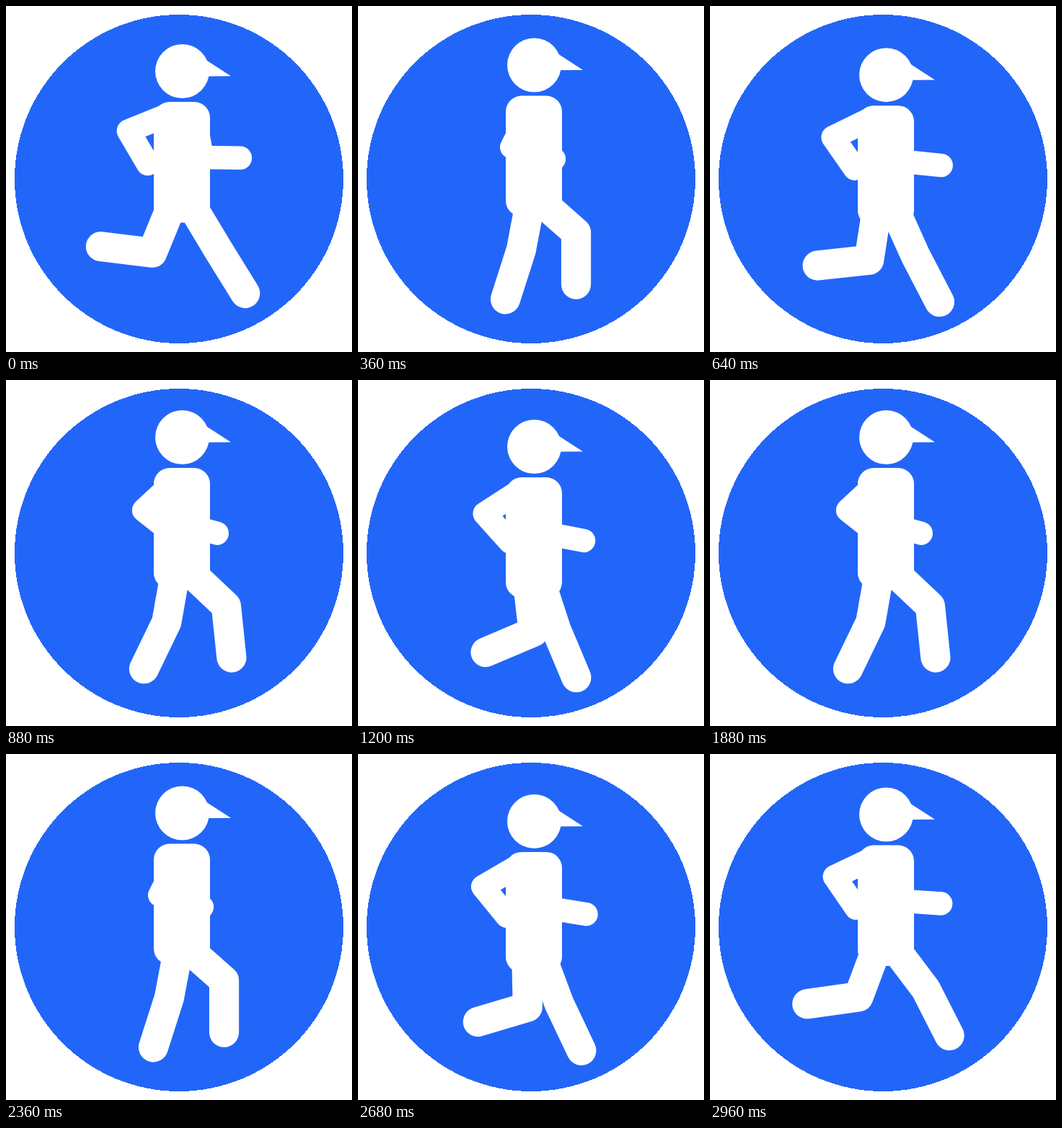
Animation, 480 px wide and 480 px high, one loop 3000 ms. Source, as an HTML page:

```html
<!DOCTYPE html>
<html lang="en">
<head>
<meta charset="utf-8">
<title>Runner</title>
<style>
  html, body { margin: 0; width: 100%; height: 100%; overflow: hidden; background: #fff; }
  svg { display: block; width: 100vw; height: 100vh; }
  .limb { fill: none; stroke: #fff; stroke-linecap: round; stroke-linejoin: round; }
  .arm { stroke-width: 32.5; }
  .leg { stroke-width: 41.2; }
</style>
</head>
<body>
<svg viewBox="0 0 480 480">
  <circle cx="240" cy="240" r="228" fill="#2266f9" shape-rendering="crispEdges"/>
  <polyline class="limb arm"/>
  <polyline class="limb arm"/>
  <polyline class="limb leg"/>
  <polyline class="limb leg"/>
  <g id="body" fill="#fff">
    <circle cx="244.5" cy="37.5" r="37.5"/>
    <path d="M278 22.3L312 44.2L280 44.5Z"/>
    <rect x="205" y="80" width="78" height="167.5" rx="22"/>
  </g>
</svg>
<script>
const STRIDE = 1000, STEP = 40, LOOP = 3000;
const THIGH = 75, SHIN = 72, UPPER = 60, FORE = 53;

// Smooth periodic curve through keyed values.
function track(times, values, period) {
  const n = times.length;
  const at = i => times[(i + n) % n] + Math.floor(i / n) * period;
  const val = i => values[(i + n) % n];
  const slope = i => (val(i + 1) - val(i - 1)) / (at(i + 1) - at(i - 1));
  return t => {
    t = ((t % period) + period) % period;
    let i = n - 1;
    while (times[i] > t) i--;
    const d = at(i + 1) - at(i), u = (t - at(i)) / d, v = 1 - u;
    return val(i) * v * v * (1 + 2 * u) + val(i + 1) * u * u * (3 - 2 * u)
      + d * u * v * (slope(i) * v - slope(i + 1) * u);
  };
}

const half = [0, 60, 130, 200, 280, 360, 380, 460];
const full = half.concat(half.map(t => t + STRIDE / 2));
const cycle = values => track(full, values, STRIDE);
const swing = values => cycle(values.concat(values.map(v => -v)));

// Angles are degrees from straight down, positive towards the front.
const thigh = cycle([31, 29.5, 25, 18, 4, -10.7, -10, -20.5,
                     -22.3, -23.5, -11, 6.5, 29, 48.6, 46.7, 37]);
const shin = cycle([31.7, 31, 28, 22.8, 3, -17.7, -25.8, -82,
                    -97, -97, -86, -67, -35, 0, 6, 27]);
const upper = cycle([-68, -69, -65, -57, -42, -25, -10, 7,
                     10, 10, 6, 0, -12, -27, -47, -64.5]);
const bend = cycle([98.5, 98.5, 99, 99, 99, 98, 85, 79,
                    79, 79, 79, 79, 85, 98, 98.6, 99]);
const hip = swing([12, 12.5, 11.5, 8.5, 3, -3, -7.5, -11]);
const shoulder = swing([-18, -19, -19, -17.5, -8, 3, 8.5, 16.5]);
const bob = track([0, 60, 130, 200, 280, 320, 360, 380, 405, 430, 460],
                  [53, 58, 58.5, 55, 53.5, 48.8, 44.5, 42, 40.4, 41.8, 46.5], STRIDE / 2);

const body = document.getElementById("body");
const arms = document.querySelectorAll(".arm");
const legs = document.querySelectorAll(".leg");

function reach([x, y], length, angle) {
  const a = angle * Math.PI / 180;
  return [x + length * Math.sin(a), y + length * Math.cos(a)];
}

function drawLimb(line, root, len1, angle1, len2, angle2) {
  const joint = reach(root, len1, angle1);
  const end = reach(joint, len2, angle2);
  line.setAttribute("points", [root, joint, end].map(p => p.map(c => c.toFixed(2)).join()).join(" "));
}

function draw(time) {
  const top = bob(time);
  body.setAttribute("transform", `translate(0 ${top.toFixed(2)})`);
  for (let side = 0; side < 2; side++) {
    const t = time + side * STRIDE / 2;
    const a = upper(t);
    drawLimb(arms[side], [243.5 + shoulder(t), top + 97.8], UPPER, a, FORE, a + bend(t));
    drawLimb(legs[side], [243.3 + hip(t), top + 220], THIGH, thigh(t), SHIN, shin(t));
  }
}

const start = performance.now();
function tick() {
  const t = (performance.now() - start) % LOOP;
  draw(Math.floor(t / STEP) * STEP);
  requestAnimationFrame(tick);
}
tick();
</script>
</body>
</html>
```
